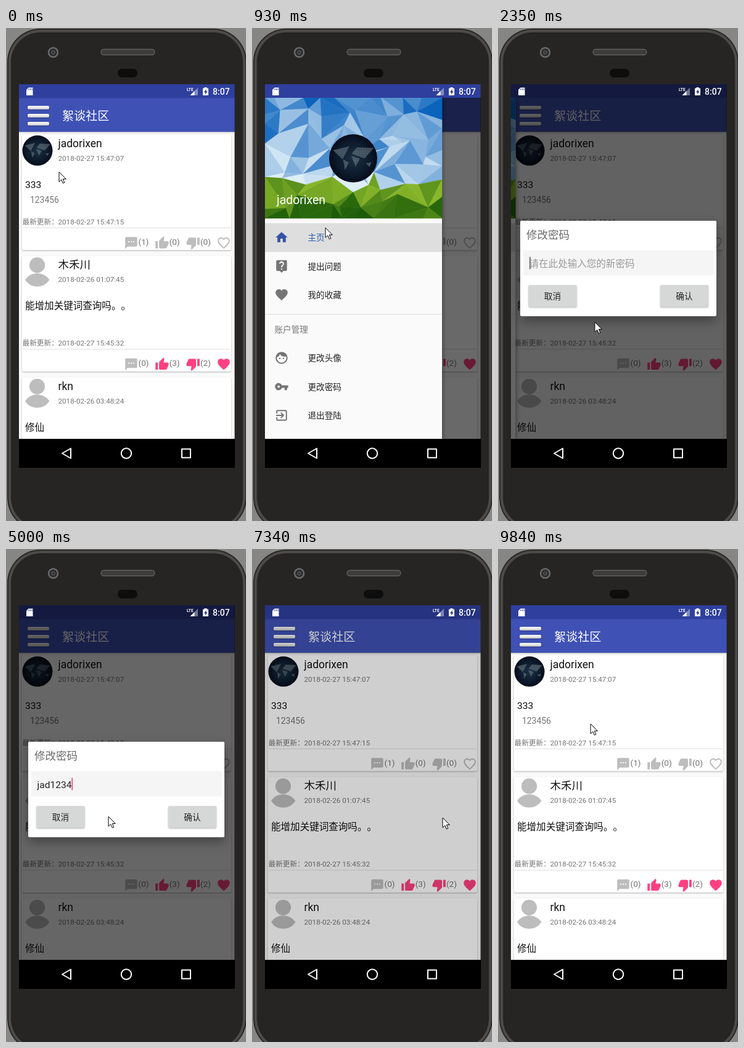
An HTML page that plays this animation: 389x798 px, repeating every 9.92 s.

```html
<!DOCTYPE html>
<html lang="zh-CN">
<head>
<meta charset="utf-8">
<title>修改密码</title>
<style>
html, body { margin: 0; width: 100%; height: 100%; overflow: hidden; background: #868685; }
svg { display: block; width: 100vw; height: 100vh; font-family: Roboto, "Noto Sans CJK SC", "Noto Sans CJK", sans-serif; }
text { white-space: pre; text-spacing-trim: space-all; }
.raised { filter: drop-shadow(0 1px 1px rgba(0,0,0,.3)); }
#drawer .panel { filter: drop-shadow(1px 0 3px rgba(0,0,0,.4)); }
#dialog { transform-origin: 195px 389px; }
#dialog .panel { filter: drop-shadow(0 8px 9px rgba(0,0,0,.35)); }
</style>
</head>
<body>
<svg id="stage" viewBox="0 0 389 798"></svg>
<script>
const LOOP = 9920;
const GREY = '#bdbdbd', PINK = '#ff4081', SOFT = '#757575', INK = '#111', DARK = '#212121';
const USER = 'jadorixen', PASSWORD = 'jad1234567';

// Icons on a 24-unit grid; inner subpaths are holes.
const ICONS = {
  heart: 'M12 21.300C5 15 2 12 2 8.500A5.450 5.450 0 0 1 12 5.100A5.450 5.450 0 0 1 22 8.500C22 12 19 15 12 21.300z',
  comment: 'M4 2h16a2 2 0 0 1 2 2v12a2 2 0 0 1-2 2H6l-4 4V4a2 2 0 0 1 2-2zM7 9h2v2H7zm4 0h2v2h-2zm4 0h2v2h-2z',
  thumb: 'M1 9h4v12H1zM7 9q0-.8.600-1.400L14.200 1l1.500 1.600-1 6.400H21a2 2 0 0 1 2 2v2l-3.200 6.800a2 2 0 0 1-1.800 1.200H9a2 2 0 0 1-2-2z',
  home: 'M10 20v-6h4v6h5v-8h3L12 3 2 12h3v8z',
  help: 'M5 2h14a2 2 0 0 1 2 2v14a2 2 0 0 1-2 2h-4l-3 3-3-3H5a2 2 0 0 1-2-2V4a2 2 0 0 1 2-2zM11 16h2v2h-2zM8 8a4 4 0 1 1 6.500 3C13.500 12 13 12.500 13 14h-2c0-2.500 1-3 2-4A2 2 0 1 0 10 8z',
  face: 'M2 12a10 10 0 1 0 20 0a10 10 0 1 0-20 0zM4.100 11C6.500 10 8.500 8 9.300 5.800 11 8.300 14 10 17.400 10l2.300-.3A8 8 0 0 1 12 20 8 8 0 0 1 4.100 11zM7.800 13a1.200 1.200 0 1 0 2.400 0a1.200 1.200 0 1 0-2.400 0zm6 0a1.200 1.200 0 1 0 2.400 0a1.200 1.200 0 1 0-2.400 0z',
  key: 'M12.600 10A6 6 0 1 0 12.600 14H17v4h4v-4h2v-4zM5 12a2 2 0 1 0 4 0a2 2 0 1 0-4 0z',
  exit: 'M10 15.600L11.500 17l5-5-5-5L10 8.400 12.700 11H3v2h9.700zM3 9V5a2 2 0 0 1 2-2h14a2 2 0 0 1 2 2v14a2 2 0 0 1-2 2H5a2 2 0 0 1-2-2v-4h2v4h14V5H5v4z'
};

const text = (x, y, size, fill, str, more = '') =>
  `<text x="${x}" y="${y}" font-size="${size}" fill="${fill}" ${more}>${str}</text>`;
const rect = (x, y, w, h, fill, more = '') =>
  `<rect x="${x}" y="${y}" width="${w}" height="${h}" fill="${fill}" ${more}/>`;
const icon = (name, x, y, fill, turn = '', more = '') =>
  `<path transform="translate(${x} ${y}) scale(.972) ${turn}" fill="${fill}" fill-rule="evenodd" d="${ICONS[name]}" ${more}/>`;
const globe = (x, y, r) =>
  `<use href="#globe" transform="translate(${x - r} ${y - r}) scale(${r / 50})"/>`;
const repeat = (n, draw) => Array.from({ length: n }, (_, i) => draw(i)).join('');

function card({ name, date, body, note = '', updated, counts, liked, avatar }, index) {
  const on = liked ? PINK : GREY;
  const blank = `<circle cx="50.5" cy="187.500" r="12.600" fill="${GREY}"/>
    <path d="M31 211q7-10.500 19.500-10.500t20 10.500q-7 11-20 11t-19.500-11z" fill="${GREY}"/>`;
  const like = liked
    ? icon('heart', 341.3, 336.3, on)
    : icon('heart', 341.3, 336.3, 'none', 'translate(1.200 1.200) scale(.9)', `stroke="${on}" stroke-width="2.200"`);
  return `<g transform="translate(0 ${index * 196.4})">
    ${rect(25.5, 172.5, 339.5, 187, '#fff', 'rx="2.500" class="raised"')}
    ${avatar || blank}
    ${text(84.5, 193, 17.5, INK, name)}
    ${text(84.5, 215, 11.67, SOFT, date)}
    ${text(31, 259, 15.55, INK, body)}
    ${text(39, 283, 13.9, SOFT, note)}
    ${text(26.5, 318, 11.67, SOFT, '最新更新：')}
    ${text(84.5, 318, 11.67, SOFT, updated)}
    ${rect(27, 323, 337, 1, '#dedede')}
    ${icon('comment', 191.3, 336.3, GREY)}
    ${icon('thumb', 241.3, 336.3, on)}
    ${icon('thumb', 291.5, 336.3, on, 'rotate(180 12 12)')}
    ${like}
    ${counts.map((n, i) => text(214.5 + i * 50.2, 351, 13.6, SOFT, `(${n})`)).join('')}
  </g>`;
}

// Faceted landscape: a jittered mesh, blue fading to white above the horizon, green below.
function facets(x0, y0, width, height) {
  const cols = 9, rows = 7, horizon = .7;
  let seed = 11;
  const random = () => (seed = seed * 16807 % 2147483647) / 2147483647;
  const jitter = (i, n) => (i + (i % n ? random() - .5 : 0)) / n;
  const mix = (a, b, k) => `rgb(${a.map((v, i) => Math.round(v + (b[i] - v) * Math.min(1, Math.max(0, k))))})`;
  const shade = y => y < horizon
    ? mix([10, 98, 188], [222, 238, 247], y * .8 + random() * .75 - .15)
    : mix([160, 202, 50], [28, 92, 8], (y - horizon) * 2.5 + random() * .6 - .1);
  const grid = Array.from({ length: rows + 1 }, (_, r) =>
    Array.from({ length: cols + 1 }, (_, c) => [jitter(c, cols), jitter(r, rows)]));
  const triangle = (...corners) => {
    const fill = shade(corners.reduce((sum, p) => sum + p[1] / 3, 0));
    const points = corners.map(([x, y]) => [(x * width).toFixed(1), (y * height).toFixed(1)]).join(' ');
    return `<polygon points="${points}" fill="${fill}" stroke="${fill}" stroke-width=".6"/>`;
  };
  const cell = (r, c) => {
    const a = grid[r][c], b = grid[r][c + 1], d = grid[r + 1][c], e = grid[r + 1][c + 1];
    return random() < .5 ? triangle(a, b, e) + triangle(a, e, d) : triangle(a, b, d) + triangle(b, e, d);
  };
  return `<g transform="translate(${x0} ${y0})">${repeat(rows, r => repeat(cols, c => cell(r, c)))}</g>`;
}

const defs = `<defs>
  <clipPath id="screen">${rect(21, 91, 349.5, 621, INK)}</clipPath>
  <clipPath id="content">${rect(21, 113, 349.5, 552, INK)}</clipPath>
  <linearGradient id="metal" x2="0" y2="1"><stop stop-color="#fff"/><stop offset="1" stop-color="#cfcfcf"/></linearGradient>
  <radialGradient id="night"><stop stop-color="#1b3044"/><stop offset=".7" stop-color="#0c1a2b"/><stop offset="1" stop-color="#050c1a"/></radialGradient>
  <pattern id="dots" width="2" height="2" patternUnits="userSpaceOnUse">${rect(0, 0, 1.5, 1.5, '#6c7a84')}</pattern>
  <g id="globe"><circle cx="50" cy="50" r="50" fill="url(#night)"/>
    <path fill="url(#dots)" d="M8 33L42 25 28 52zM29 52L41 59 33 74zM47 40L58 27 92 29 74 50 62 46zM46 45L64 51 55 67zM76 60L88 58 84 68z"/></g>
</defs>`;

const rim = i => {
  const inset = i * 1.3, tone = 34 + 48 * Math.sin(Math.PI * i / 5);
  return rect(2 + inset, 1 + inset, 388 - inset * 2, 813 - inset * 2, `rgb(${tone},${tone - 2},${tone - 4})`, `rx="${54 - inset}"`);
};
const phone = `${repeat(6, rim)}
  ${rect(10, 9, 372, 797, '#272523', 'rx="45"')}
  <circle cx="76.500" cy="39.500" r="7.500" fill="#2c2c2c" stroke="#6a6a6a" stroke-width="2.500"/>
  <circle cx="76.500" cy="39.500" r="3" fill="#3a3c3e" stroke="#5c5f62"/>
  ${rect(154, 34.5, 87, 9, '#3d3c3b', 'rx="4.500" stroke="#62605e" stroke-width="1.300"')}
  ${rect(181, 66, 32, 14, '#0d0d0d', 'rx="7"')}`;

const statusIcons = `
  <path d="M36.500 96.500h7v12.500h-10.500v-9z" fill="#fff"/>
  <path d="M37 98v2.500M39.500 98v2.500M42 98v2.500" stroke="#26338a"/>
  ${text(293, 102, 6.5, '#fff', 'LTE', 'font-weight="700"')}
  <path d="M311 96.500V109H298.500z" fill="#fff" opacity=".4"/><path d="M305.500 102V109H298.500z" fill="#fff"/>
  <path d="M321.500 96h4v1.500h2.500V109h-9V97.500h2.500z" fill="#fff"/>
  <path d="M324.500 99l-3.500 5h2v3.500l3.500-5h-2z" fill="#26338a"/>
  ${text(335, 107.5, 14, '#fff', '8:07', 'font-weight="500"')}`;

const toolbar = `${rect(21, 113, 350, 55, '#3f51b5', 'class="raised"')}
  ${repeat(3, i => rect(35, 126 + i * 13, 35, 5.8, 'url(#metal)', 'rx="2" class="raised"'))}
  ${text(91, 148.5, 19.1, '#fff', '絮谈社区')}`;

const feed = rect(21, 168, 350, 497, '#fafafa') + [
  { name: USER, date: '2018-02-27 15:47:07', body: '333', note: '123456', updated: '2018-02-27 15:47:15', counts: [1, 0, 0], avatar: globe(51, 198.3, 24.5) },
  { name: '木禾川', date: '2018-02-26 01:07:45', body: '能增加关键词查询吗。。', updated: '2018-02-27 15:45:32', counts: [0, 3, 2], liked: true },
  { name: 'rkn', date: '2018-02-26 03:48:24', body: '修仙', updated: '', counts: [] }
].map(card).join('');

const menu = (top, items) => Object.entries(items).map(([name, label], i) => {
  const y = top + i * 46.5, home = name === 'home';
  return icon(name, 36.3, y - 11.7, home ? '#3353a8' : SOFT) + text(90.5, y + 5, 13.6, home ? '#2c5cb0' : DARK, label);
}).join('');

const drawer = `<g clip-path="url(#content)">
  ${rect(21, 113, 350, 552, '#000', 'id="scrim"')}
  <g id="drawer">
    ${rect(21, 113, 287, 553, '#fafafa', 'class="panel"')}
    ${facets(21, 113, 287, 195)}
    ${globe(164, 211, 39)}
    ${text(40, 285, 19.44, '#fff', USER)}
    ${rect(21, 316, 287, 46.5, '#dedede')}
    ${menu(339, { home: '主页', help: '提出问题', heart: '我的收藏' })}
    ${rect(21, 463, 287, 1, '#dcdcdc')}
    ${text(36.5, 492.5, 13.6, SOFT, '账户管理')}
    ${menu(534, { face: '更改头像', key: '更改密码', exit: '退出登陆' })}
  </g></g>`;

const button = (x, label, id) =>
  rect(x, 416, 78, 35.5, '#d6d7d7', `rx="2" class="raised" id="${id}"`) + text(x + 25.3, 438.5, 13.6, DARK, label);

const dialog = `${rect(21, 91, 350, 574, '#000', 'id="dim"')}
  <g id="dialog">
    ${rect(36, 312, 318, 154.5, '#fff', 'rx="2" class="panel"')}
    ${text(46, 340.5, 17.5, '#6b6b6b', '修改密码')}
    ${rect(41, 360, 309, 40.5, '#f5f5f5')}
    ${text(50.5, 386.5, 15.55, '#9a9a9a', '请在此处输入您的新密码', 'id="hint"')}
    ${text(50.5, 386.5, 15.55, DARK, '', 'id="typed"')}
    ${rect(51, 370.5, 1.7, 20, PINK, 'id="caret"')}
    ${button(49.5, '取消', 'cancel')}
    ${button(263, '确认', 'confirm')}
  </g>`;

const navBar = `${rect(21, 665, 350, 47.5, '#000')}
  <g fill="none" stroke="#fff" stroke-width="2" stroke-linejoin="round">
    <path d="M105 680.500v16l-14-8z"/><circle cx="195" cy="688.500" r="8.200"/><path d="M285 681.500h14v14h-14z"/>
  </g>`;

const toast = `<g id="toast">${rect(101.5, 560.5, 187.5, 42.5, '#5c5c5c', 'rx="21.200" opacity=".94"')}
  ${text(125.5, 587.3, 15.5, '#f2f2f2', '您已经成功修改密码')}</g>`;

const cursor = `<path id="cursor" d="M0 0V16L3.800 12.500 6.300 18.300 8.800 17.200 6.300 11.500H11.300Z" fill="#fff" stroke="#000"/>`;

document.getElementById('stage').innerHTML = defs + phone +
  `<g clip-path="url(#screen)">${feed + toolbar + rect(21, 91, 350, 22.5, '#2f3f9e') + drawer + dialog + statusIcons + navBar + toast}</g>` + cursor;

const $ = id => document.getElementById(id);
const EASE_OUT = 'cubic-bezier(.215,.61,.355,1)';
const tracks = [];

// Plays legs of [start, end, value]; the value rests between legs.
function track(id, prop, first, easing, ...legs) {
  const frames = [{ offset: 0, [prop]: first }];
  let value = first;
  for (const [from, to, next] of legs) {
    frames.push({ offset: from / LOOP, [prop]: value, easing }, { offset: to / LOOP, [prop]: next });
    value = next;
  }
  frames.push({ offset: 1, [prop]: value });
  const animation = $(id).animate(frames, { duration: LOOP, fill: 'both' });
  animation.pause();
  tracks.push(animation);
}
const at = (x, y = 0) => `translate(${x}px, ${y}px)`;

track('cursor', 'transform', at(86, 233), EASE_OUT,
  [90, 330, at(56, 150)], [600, 930, at(119, 322)], [930, 1100, at(117, 398)], [1250, 1880, at(135, 580)],
  [2200, 2670, at(166, 433)], [6010, 7020, at(309, 435)], [8350, 8430, at(293, 421)], [8430, 9450, at(54, 149)],
  [9530, 9840, at(150, 283)]);
track('drawer', 'transform', at(-300), EASE_OUT, [400, 690, at(0)], [2120, 2500, at(-300)]);
track('scrim', 'opacity', 0, EASE_OUT, [400, 690, .59], [2120, 2500, 0]);
track('dim', 'opacity', 0, 'linear', [2120, 2350, .6], [7170, 7420, 0]);
track('dialog', 'opacity', 0, 'linear', [2120, 2350, 1], [7120, 7220, 0]);
track('dialog', 'transform', 'scale(.9)', EASE_OUT, [2120, 2350, 'scale(1)']);
track('confirm', 'fill', '#d6d7d7', 'linear', [6900, 7020, '#c2c3c3']);
track('toast', 'opacity', 0, 'linear', [7340, 7650, 1], [9400, 9720, 0]);

// Typing comes in bursts; the caret blinks off just before the first two.
const bursts = [{ start: 3280, gap: 160, keys: 3 }, { start: 4340, gap: 180, keys: 3 }, { start: 5000, gap: 320, keys: 4 }];
const typed = $('typed'), caret = $('caret');

function render(t) {
  tracks.forEach(animation => animation.currentTime = t);
  const count = bursts.reduce((sum, { start, gap, keys }) =>
    sum + Math.max(0, Math.min(keys, Math.floor((t - start) / gap) + 1)), 0);
  const blink = bursts.slice(0, 2).some(({ start }) => t >= start - 170 && t < start);
  typed.textContent = PASSWORD.slice(0, count);
  $('hint').style.visibility = count ? 'hidden' : 'visible';
  caret.setAttribute('x', 50.5 + (count ? typed.getComputedTextLength() : .5));
  caret.setAttribute('fill', count ? PINK : '#666');
  caret.style.visibility = blink ? 'hidden' : 'visible';
}

const start = performance.now();
function tick() {
  render((performance.now() - start) % LOOP);
  requestAnimationFrame(tick);
}
tick();
</script>
</body>
</html>
```
